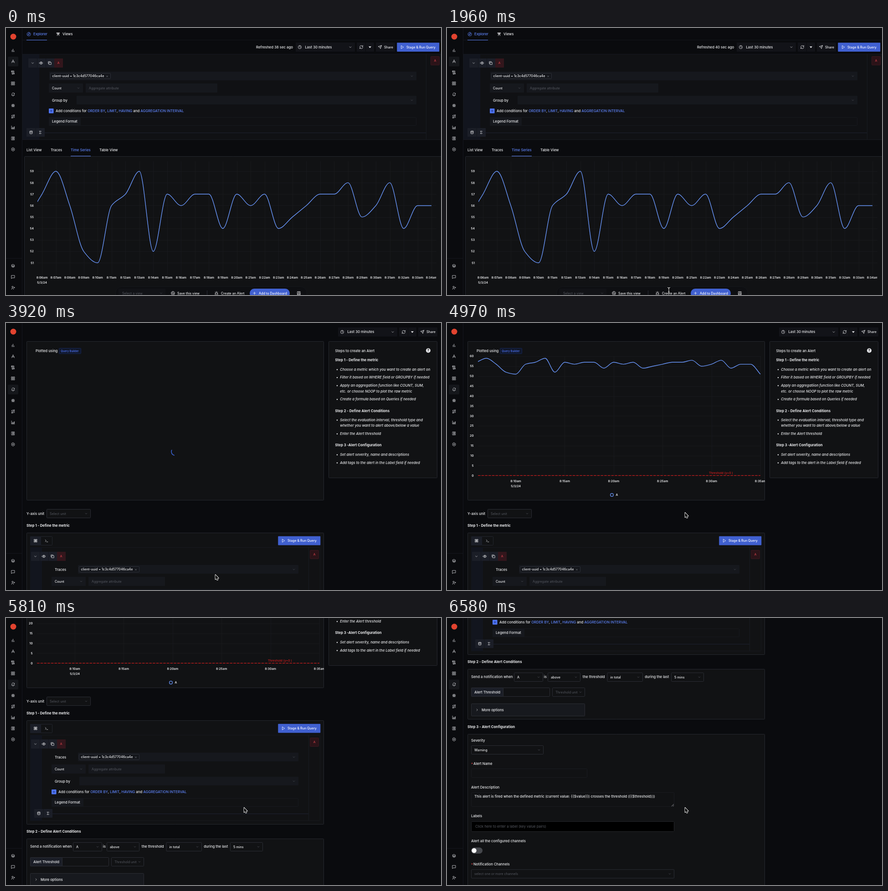
Recreate the animation shown at these times as an HTML page with a canvas. Size 955 by 587 pixels, loop 6.65 s.

```html
<!DOCTYPE html>
<html lang="en">
<head>
<meta charset="utf-8">
<title>Alert from trace explorer</title>
<style>
html, body { margin: 0; width: 100%; height: 100%; overflow: hidden; background: #0a0b0e; }
canvas { display: block; }
</style>
</head>
<body>
<canvas id="stage" width="955" height="587"></canvas>
<script>
const ctx = document.getElementById('stage').getContext('2d');
const LOOP = 6650, STEP = 70;
const BG = '#0a0b0e', PANEL = '#111214', FIELD = '#16181d', CHIP = '#1b1e27', EDGE = '#26282f', LINE = '#1b1e28';
const TEXT = '#eeeff1', MUTED = '#54575f', BLUE = '#5f84f8', BUTTON = '#4060d0', CURVE = '#6996fa', RED = '#d2424a';
const THRESHOLD = '#cc1d1d';
const LARGE = 7.74, SMALL = 7.18, TINY = 6.63;

const ICONS = {
  bars: 'M6 20V10M12 20V4M18 20v-6',
  compass: 'M12 7a2 2 0 1 0 0-4 2 2 0 0 0 0 4zM11 7 4 20M13 7l7 13M5 13c4 3 10 3 14 0',
  scroll: 'M8 21h12v-3H10v3a2 2 0 0 1-4 0V5a2 2 0 0 0-4 0v3h4M4 3h13v15M10 8h4M10 12h4',
  grid: 'M3 3h7v7H3zM14 3h7v7h-7zM14 14h7v7h-7zM3 14h7v7H3z',
  bell: 'M15 3a6 6 0 0 0-9 5c0 7-3 9-3 9h18s-2-1-3-5M10 21h4M19 5a2 2 0 1 0 0 4 2 2 0 0 0 0-4z',
  bug: 'M8 8a4 4 0 0 1 8 0M7 10h10v5a5 5 0 0 1-10 0zM12 11v9M3 13h4M17 13h4M4 20l3-2M20 20l-3-2M4 6l3 3M20 6l-3 3',
  route: 'M6 22a3 3 0 1 0 0-6 3 3 0 0 0 0 6zM9 19h8a3.5 3.5 0 0 0 0-7H7a3.5 3.5 0 0 1 0-7h8M18 8a3 3 0 1 0 0-6 3 3 0 0 0 0 6z',
  area: 'M3 3v18h18M7 16l4-6 4 4 5-7v9z',
  receipt: 'M4 3h16v18H4zM9 8h6M9 12h6M9 16h6M12 6v12',
  gear: 'M12 2l8.5 5v10L12 22l-8.5-5V7zM12 9a3 3 0 1 0 0 6 3 3 0 0 0 0-6z',
  layers: 'M12 3l9 5-9 5-9-5zM3 12l9 5 9-5M3 16l9 5 9-5',
  chat: 'M3 4h18v14H8l-5 4z',
  invite: 'M15 21a6 6 0 0 0-12 0M9 11a4 4 0 1 0 0-8 4 4 0 0 0 0 8zM19 8v6M16 11h6',
  explore: 'M12 2a10 10 0 1 0 0 20 10 10 0 0 0 0-20zM16 8l-2 6-6 2 2-6z',
  views: 'M4 4h16v4H4zM9 8l-2 13M15 8l2 13M12 8v5M8 13h8',
  clock: 'M12 2a10 10 0 1 0 0 20 10 10 0 0 0 0-20zM12 6v6l4 2',
  refresh: 'M3 11a9 9 0 0 1 17-3M21 3v5h-5M21 13a9 9 0 0 1-17 3M3 21v-5h5',
  send: 'M22 2 11 13M22 2l-7 20-4-9-9-4z',
  play: 'M6 3l14 9-14 9z',
  down: 'M5 9l7 7 7-7',
  right: 'M9 5l7 7-7 7',
  eye: 'M2 12c5-9 15-9 20 0-5 9-15 9-20 0zM12 9a3 3 0 1 0 0 6 3 3 0 0 0 0-6z',
  copy: 'M8 8h13v13H8zM4 16H3V3h13v1',
  close: 'M6 6l12 12M18 6 6 18',
  plus: 'M12 4v16M4 12h16',
  sigma: 'M18 7V4H6l7 8-7 8h12v-3',
  data: 'M4 5c0-3 16-3 16 0s-16 3-16 0v14c0 3 16 3 16 0V5M4 12c0 3 16 3 16 0',
  save: 'M12 2a10 10 0 1 0 0 20 10 10 0 0 0 0-20zM7 9h8l3 4M17 15H9l-3-4',
  alarm: 'M3 19h18M5 19v-3a7 7 0 0 1 14 0v3M12 3v4M4 6l2 2M20 6l-2 2',
  book: 'M4 3h16v18H4zM4 16h16M9 7h6M9 11h6',
  nodes: 'M4 4h6v6H4zM14 4h6v6h-6zM4 14h6v6H4zM14 14h6v6h-6zM10 10l4 4M14 10l-4 4',
  shell: 'M4 6l6 6-6 6M12 19h8'
};
const paths = Object.fromEntries(Object.entries(ICONS).map(([k, d]) => [k, new Path2D(d)]));

function icon(name, x, y, size = 9, color = TEXT, weight = 2.2) {
  ctx.save();
  ctx.translate(x - size / 2, y - size / 2);
  ctx.scale(size / 24, size / 24);
  ctx.lineWidth = weight;
  ctx.lineCap = ctx.lineJoin = 'round';
  ctx.strokeStyle = color;
  ctx.stroke(paths[name]);
  ctx.restore();
}

function text(str, x, y, { size = LARGE, color = TEXT, weight = 500, align = 'left', style = '' } = {}) {
  ctx.font = `${style} ${weight} ${size}px Inter, sans-serif`;
  ctx.textAlign = align;
  ctx.fillStyle = color;
  ctx.fillText(str, x, y + size * 0.36);
  return ctx.measureText(str).width;
}
const small = (str, x, y, color = TEXT) => text(str, x, y, { size: SMALL, color, weight: color === MUTED ? 400 : 500 });
const bold = (str, x, y) => text(str, x, y, { weight: 700 });

function box(x1, y1, x2, y2, fill, stroke, r = 1) {
  ctx.beginPath();
  if (stroke) ctx.roundRect(x1 + 0.5, y1 + 0.5, x2 - x1 - 1, y2 - y1 - 1, r);
  else ctx.roundRect(x1, y1, x2 - x1, y2 - y1, r);
  if (fill) { ctx.fillStyle = fill; ctx.fill(); }
  if (stroke) { ctx.strokeStyle = stroke; ctx.lineWidth = 1; ctx.stroke(); }
}
const rule = (x1, y1, x2, y2, color = LINE) => box(x1, y1, Math.max(x2, x1 + 1), Math.max(y2, y1 + 1), color, null, 0);

function disc(x, y, r, color) {
  ctx.beginPath();
  ctx.arc(x, y, r, 0, 7);
  ctx.fillStyle = color;
  ctx.fill();
}

function clipped(x, y, w, h, draw) {
  ctx.save();
  ctx.beginPath();
  ctx.rect(x, y, w, h);
  ctx.clip();
  draw();
  ctx.restore();
}

// Tangents of a monotone cubic through [x, y] points
function tangents(pts) {
  const last = pts.length - 1;
  const dx = [], slope = [];
  for (let i = 0; i < last; i++) {
    dx[i] = pts[i + 1][0] - pts[i][0];
    slope[i] = (pts[i + 1][1] - pts[i][1]) / dx[i];
  }
  return pts.map((_, i) => {
    if (i === 0) return slope[0];
    if (i === last) return slope[last - 1];
    const a = slope[i - 1], b = slope[i], p = dx[i - 1], q = dx[i];
    return a * b <= 0 ? 0 : 3 * (p + q) / ((2 * q + p) / a + (q + 2 * p) / b);
  });
}

function along(pts, t) {
  const last = pts.length - 1;
  if (t <= pts[0][0]) return pts[0][1];
  if (t >= pts[last][0]) return pts[last][1];
  const m = tangents(pts);
  const i = pts.findIndex(p => p[0] > t) - 1;
  const [x0, y0] = pts[i], [x1, y1] = pts[i + 1];
  const h = x1 - x0, u = (t - x0) / h, v = 1 - u;
  return y0 * (1 + 2 * u) * v * v + m[i] * h * u * v * v + y1 * u * u * (3 - 2 * u) - m[i + 1] * h * u * u * v;
}

// One value per minute from 8:05am
const COUNTS = [55, 57, 59, 56, 52, 51, 56, 57, 59, 52, 57, 56, 57, 57, 54, 57,
  56, 57, 54, 55, 56, 57, 57, 58, 55, 56, 58, 54, 56, 56, 51];
const clockLabel = i => `8:${String(5 + i).padStart(2, '0')}am`;

function curve(xOf, yOf) {
  const pts = COUNTS.map((v, i) => [xOf(i), yOf(v)]);
  const m = tangents(pts);
  ctx.beginPath();
  ctx.moveTo(...pts[0]);
  for (let i = 1; i < pts.length; i++) {
    const [x0, y0] = pts[i - 1], [x1, y1] = pts[i], h = (x1 - x0) / 3;
    ctx.bezierCurveTo(x0 + h, y0 + m[i - 1] * h, x1 - h, y1 - m[i] * h, x1, y1);
  }
  ctx.strokeStyle = CURVE;
  ctx.lineWidth = 1.4;
  ctx.stroke();
}

const GRID = '#18191c';
const axis = (str, x, y, align = 'center') => text(str, x, y, { size: TINY, weight: 600, align });

function sidebar(active) {
  rule(0, 0, 35, 587, BG);
  rule(35, 0, 36, 587, '#15171d');
  disc(16, 19, 6.5, '#e2432f');
  box(4, active - 10.5, 27, active + 11, '#15171b', null, 2);
  ['bars', 'compass', 'scroll', 'grid', 'bell', 'bug', 'route', 'area', 'receipt', 'gear']
    .forEach((name, i) => icon(name, 15.5, 49.3 + i * 24.18, 9, '#d2d4d8'));
  rule(0, 506, 35, 507, '#15171d');
  ['layers', 'chat', 'invite'].forEach((name, i) => icon(name, 15.5, 523 + i * 24, 9, '#d2d4d8'));
}

function timePicker(x, y) {
  box(x, y - 10, x + 130, y + 10, '#121318');
  icon('clock', x + 9, y, 8.5);
  text('Last 30 minutes', x + 20.5, y);
  icon('down', x + 120, y, 7);
  box(x + 134, y - 10, x + 172, y + 10, '#121318');
  icon('refresh', x + 144, y, 9);
  rule(x + 153, y - 10, x + 154, y + 10, BG);
  ctx.fillStyle = TEXT;
  ctx.beginPath();
  ctx.moveTo(x + 160, y - 1.5);
  ctx.lineTo(x + 166, y - 1.5);
  ctx.lineTo(x + 163, y + 2);
  ctx.fill();
  box(x + 176, y - 10, x + 218, y + 10, '#121318');
  icon('send', x + 185, y, 8.5);
  small('Share', x + 194, y);
}

function runButton(x, y) {
  box(x + 0.3, y, x + 93.3, y + 19.6, BUTTON);
  icon('play', x + 12, y + 9.8, 8.5, '#fff');
  text('Stage & Run Query', x + 21, y + 9.8, { size: 7.1, color: '#fff' });
}

function badge(x, y) {
  box(x, y, x + 20, y + 20, '#2b1318', '#3a181f');
  text('A', x + 10, y + 10, { size: TINY, color: RED, align: 'center' });
}

// Query form, placed relative to the explorer layout
function queryForm(dx, dy, right, filterLeft, footX, lineEnd) {
  ctx.save();
  ctx.translate(dx, dy);
  right -= dx; filterLeft -= dx; footX -= dx; lineEnd -= dx;
  box(49, 67, 125, 87, CHIP);
  box(106, 67, 125, 87, '#33161c');
  [68, 87].forEach(x => rule(x, 67, x + 1, 87, '#14161c'));
  icon('down', 58.5, 77, 7);
  icon('eye', 77, 77, 9);
  icon('copy', 96, 77, 8.5);
  text('A', 115, 77, { size: TINY, color: RED, align: 'center' });

  box(filterLeft, 96, right, 115, FIELD);
  const tag = filterLeft + 2;
  box(tag, 99, tag + 133, 112, '#14161b', '#2d3038');
  small('client-uuid = 1c3c4d577046ca4e', tag + 4.5, 105.8);
  icon('close', tag + 125, 106.3, 6, '#90939a');
  icon('down', right - 10, 105.7, 6.5, '#5a5d66');

  box(94, 122, 169, 142, FIELD);
  small('Count', 101, 132.2);
  icon('down', 159, 132, 6.5, '#5a5d66');
  box(175, 122, dx ? 343 : 464, 142, FIELD);
  small('Aggregate attribute', 182, 132.2, MUTED);
  text('Group by', 101, 158.8);
  box(155, 149, right, 168, FIELD);
  icon('down', right - 10, 158.7, 6.5, '#5a5d66');

  box(94, 177, 104.5, 187.5, '#4e74f8');
  icon('plus', 99.2, 182.2, 7, '#111c48');
  let x = 109;
  [['Add conditions for '], ['ORDER BY', 1], [', '], ['LIMIT', 1], [', '], ['HAVING', 1], [' and '], ['AGGREGATION INTERVAL', 1]]
    .forEach(([s, link]) => { x += text(s, x, 182.3, { color: link ? BLUE : TEXT }); });

  box(94, 196, right, 215, null, '#17191e');
  box(94, 196, 164, 215, FIELD);
  text('Legend Format', 101, 205.4);
  rule(footX + 40, 230, lineEnd, 231, '#1d2130');
  box(footX, 220, footX + 40, 239, CHIP);
  rule(footX + 19.5, 220, footX + 20, 239, '#14161c');
  icon('data', footX + 10, 229.5, 8.5);
  icon('sigma', footX + 30, 229.5, 8);
  ctx.restore();
}

function explorerPage(t) {
  icon('explore', 50, 13.5, 9.5, BLUE);
  text('Explorer', 60, 13.5, { color: BLUE });
  icon('views', 114.5, 13.5, 9);
  text('Views', 124, 13.5);
  rule(36, 26, 955, 27, '#14161c');
  rule(45, 26, 90, 27, BLUE);
  text(`Refreshed ${t < 70 ? 38 : t < 1680 ? 39 : 40} sec ago`, 549, 42);
  timePicker(636, 42);
  runButton(858, 32.3);

  rule(36, 57, 955, 245, '#101114');
  rule(36, 57, 73, 245, '#12151e');
  rule(36, 57, 955, 58, '#15171e');
  rule(922, 57, 923, 245, '#191b21');
  rule(36, 245, 955, 246, '#191b21');
  badge(932, 62);
  queryForm(0, 0, 901, 95, 45, 922);

  text('List View', 45, 268.5);
  text('Traces', 98, 268.5);
  text('Time Series', 142, 268.5, { color: BLUE });
  text('Table View', 205, 268.5);
  box(40, 282, 960, 592, PANEL, '#24272e');
  rule(142, 281, 186, 282, BLUE);

  const xOf = i => 79 + (i - 1) * 30.54, yOf = v => 315 + (59 - v) * 25.15;
  for (let v = 51; v <= 59; v++) {
    rule(69, Math.round(yOf(v)), 945, 0, GRID);
    axis(v, 61, yOf(v), 'right');
  }
  clipped(69, 288, 875.5, 290, () => {
    for (let i = 1; i < 30; i++) rule(Math.round(xOf(i)), 293, 0, 541, GRID);
  });
  clipped(60, 540, 884.5, 25, () => {
    for (let i = 1; i < 30; i++) axis(clockLabel(i), xOf(i), 549);
    axis('5/3/24', xOf(1), 559.5);
  });
  clipped(69, 288, xOf(29) - 69, 260, () => curve(xOf, yOf));

  box(240, 568, 661, 610, '#0e0f12', '#15171b', 14);
  box(247, 573, 350, 593, '#121317');
  small('Select a view', 255, 583, MUTED);
  icon('down', 340.5, 583, 6.5, MUTED);
  icon('save', 366.5, 583, 9);
  small('Save this view', 376, 583);
  rule(441, 577, 442, 587, '#2a2d35');
  ctx.globalAlpha = 1 - 0.3 * Math.min(1, Math.max(0, (t - 2310) / 280));
  icon('alarm', 462, 582.5, 9);
  small('Create an Alert', 472, 583);
  ctx.globalAlpha = 1;
  box(535, 573, 623, 593, BUTTON, null, 10);
  icon('plus', 545.5, 583, 8, '#fff');
  small('Add to Dashboard', 555, 583, '#fff');
  icon('book', 643, 583, 9);
}

function alertChart() {
  const xOf = i => 151 + (i - 5) * 21.48, yOf = v => 335.3 - v * 4.37;
  for (let v = 0; v <= 60; v += 5) {
    rule(68, Math.round(yOf(v)), 688, 0, GRID);
    axis(v, 58.5, yOf(v), 'right');
  }
  clipped(46, 66, 652, 310, () => {
    for (let i = 5; i <= 30; i += 5) {
      rule(Math.round(xOf(i)), 73, 0, 335, GRID);
      axis(clockLabel(i), xOf(i), 347.7);
    }
    axis('5/3/24', xOf(5), 358.2);
  });
  clipped(68, 66, 621, 280, () => curve(xOf, yOf));
  ctx.strokeStyle = THRESHOLD;
  ctx.lineWidth = 1.3;
  ctx.setLineDash([5.5, 2.2]);
  ctx.beginPath();
  ctx.moveTo(68, yOf(0));
  ctx.lineTo(688, yOf(0));
  ctx.stroke();
  ctx.setLineDash([]);
  text('Threshold (y=0 )', 575, 329.5, { size: TINY, color: THRESHOLD });
  ctx.strokeStyle = CURVE;
  ctx.beginPath();
  ctx.arc(362, 378, 3.3, 0, 7);
  ctx.stroke();
  axis('A', 373, 378);
}

function spinner(t) {
  const turn = (t - 3920) / 1200 * Math.PI * 2;
  ctx.strokeStyle = '#3b64d6';
  ctx.lineWidth = 1.6;
  ctx.lineCap = 'round';
  ctx.beginPath();
  ctx.arc(371, 283, 8, turn + 1.8, turn + 3.6);
  ctx.stroke();
  ctx.lineCap = 'butt';
}

function select(x1, y, x2, label, color = TEXT) {
  box(x1, y - 10, x2, y + 10, PANEL, '#2b2d34');
  small(label, x1 + 7, y, color);
  icon('down', x2 - 10, y, 6.5, '#60636c');
}

function required(label, y) {
  text('*', 53, y + 1, { color: '#dc4446' });
  text(label, 58, y);
}

function guide() {
  box(708, 40, 947, 341, PANEL, EDGE);
  text('Steps to create an Alert', 722.5, 61);
  disc(927, 60.5, 5, '#e4e5e8');
  text('?', 927, 60.5, { weight: 700, color: PANEL, align: 'center' });
  bold('Step 1 - Define the metric', 722.5, 81.5);
  bold('Step 2 - Define Alert Conditions', 722.5, 193);
  bold('Step 3 -Alert Configuration', 722.5, 268.5);
  [[102, 'Choose a metric which you want to create an alert on'],
   [119.5, 'Filter it based on WHERE field or GROUPBY if needed'],
   [137.3, 'Apply an aggregatiion function like COUNT, SUM,', 'etc. or choose NOOP to plot the raw metric'],
   [167.5, 'Create a formula based on Queries if needed'],
   [213, 'Select the evaluation interval, threshold type and', 'whether you want to alert above/below a value'],
   [243.3, 'Enter the Alert threshold'],
   [289.2, 'Set alert severity, name and descriptions'],
   [307, 'Add tags to the alert in the Label field if needed']
  ].forEach(([y, ...lines]) => {
    disc(727, y + 0.5, 1.2, TEXT);
    lines.forEach((line, i) => text(line, 733.3, y + i * 12.5, { style: 'italic' }));
  });
}

function alertForm() {
  text('Y-axis unit', 45, 419.3);
  select(89, 419, 186, 'Select unit', MUTED);

  bold('Step 1 - Define the metric', 45, 445);
  box(45, 461, 698, 690, PANEL, EDGE);
  box(53, 469, 102, 489, null, '#22252d');
  box(53, 469, 77, 489, CHIP);
  icon('nodes', 65, 478.7, 9);
  icon('shell', 89, 478.7, 8.5);
  runButton(597, 468.8);
  box(53, 493, 690, 682, null, '#17191e');
  rule(53, 493, 79, 682, '#12151e');
  rule(664, 493, 665, 682, '#191b21');
  badge(667, 499);
  text('Traces', 107, 542);
  queryForm(6, 436, 642, 158, 62, 664);

  bold('Step 2 - Define Alert Conditions', 45, 705);
  box(45, 721, 698, 832, PANEL, EDGE);
  text('Send a notification when', 53, 738.7);
  select(147, 739, 211, 'A');
  text('is', 212.7, 738.7);
  select(221, 739, 293, 'above');
  text('the threshold', 297.8, 738.7);
  select(351.5, 739, 430, 'in total');
  text('during the last', 434.3, 738.7);
  select(492, 739, 564, '5 mins');
  box(53, 762, 226, 782, PANEL, '#2b2d34');
  box(53, 762, 124, 782, CHIP, '#2b2d34');
  text('Alert Threshold', 60, 772.2);
  select(231, 772, 303, 'Threshold unit', MUTED);
  box(53, 797, 303, 825, '#17191e', '#2b2d34');
  icon('right', 66, 811, 7);
  text('More options', 76, 811);

  bold('Step 3 - Alert Configuration', 45, 848);
  box(45, 864, 698, 1400, PANEL, EDGE);
  text('Severity', 53, 878.3);
  select(53, 899, 212, 'Warning');
  required('Alert Name', 929.5);
  box(53, 940, 308, 960, null, '#191b20');
  text('Alert Description', 53, 981);
  box(53, 992, 499, 1024, null, '#191b20');
  text('This alert is fired when the defined metric (current value: {{$value}}) crosses the threshold ({{$threshold}})', 60, 1001.7);
  ctx.strokeStyle = '#b5b6b9';
  ctx.lineWidth = 0.8;
  ctx.beginPath();
  ctx.moveTo(493, 1023); ctx.lineTo(498, 1018);
  ctx.moveTo(496, 1023); ctx.lineTo(498, 1021);
  ctx.stroke();
  text('Labels', 53, 1044.7);
  box(53, 1056, 499, 1079, '#000', '#25272c');
  text('Click here to enter a label (key value pairs)', 62, 1067, { color: MUTED, weight: 400 });
  text('Alert all the configured channels', 53, 1099.5);
  box(53, 1113.5, 78, 1127, '#45474c', null, 6.7);
  disc(59.5, 1120.3, 5.2, '#fff');
  required('Notification Channels', 1150.7);
  select(53, 1171.5, 499, 'select one or more channels', MUTED);
}

const SCROLL = [[5040, 0], [5390, 86], [5810, 236], [6160, 489], [6580, 609]];

function alertPage(t) {
  ctx.save();
  ctx.translate(0, -Math.round(along(SCROLL, t)));
  timePicker(729, 19.7);
  box(45, 40, 698, 390, PANEL, EDGE);
  if (t >= 4340) alertChart();
  else if (t >= 3360) spinner(t);
  text('Plotted using', 65, 61);
  box(116, 55, 165, 68, '#10172a', '#162654');
  text('Query Builder', 120.3, 61.5, { size: 6, color: '#4e74f8' });
  guide();
  alertForm();
  ctx.restore();
}

function shape(points, x, y, fill, stroke) {
  ctx.beginPath();
  points.forEach(([px, py]) => ctx.lineTo(x + px, y + py));
  ctx.closePath();
  ctx.lineJoin = 'round';
  ctx.lineWidth = 1.8;
  ctx.strokeStyle = stroke;
  ctx.stroke();
  ctx.fillStyle = fill;
  ctx.fill();
}
const ARROW = [[0.6, 0.9], [0.6, 11], [2.9, 8.9], [4.5, 12.7], [6.1, 12], [4.6, 8.4], [7.7, 8.4]];
const HAND = [[-1, 0], [1, 0], [1.2, 5], [6, 6.5], [6.5, 10], [4.5, 15], [-3, 15], [-7, 9], [-5.5, 8], [-1.2, 10]];

function beam(x, y) {
  for (const [color, width] of [['#000', 2.6], ['#e8e8e8', 1.1]]) {
    ctx.strokeStyle = color;
    ctx.lineWidth = width;
    ctx.beginPath();
    ctx.moveTo(x - 3, y - 6.5); ctx.quadraticCurveTo(x, y - 6.5, x, y - 4);
    ctx.lineTo(x, y + 4); ctx.quadraticCurveTo(x, y + 6.5, x - 3, y + 6.5);
    ctx.moveTo(x + 3, y - 6.5); ctx.quadraticCurveTo(x, y - 6.5, x, y - 4);
    ctx.moveTo(x, y + 4); ctx.quadraticCurveTo(x, y + 6.5, x + 3, y + 6.5);
    ctx.moveTo(x - 1.5, y + 2.5); ctx.lineTo(x + 1.5, y + 2.5);
    ctx.stroke();
  }
}

const CURSOR_X = [[3500, 487], [3920, 459], [3990, 464], [4130, 495], [4340, 519], [4620, 522]];
const CURSOR_Y = [[770, 590], [1190, 577], [3500, 577], [3920, 552.5], [3990, 535], [4130, 470], [4340, 422], [4620, 416]];

function cursor(t) {
  if (t < 840) return;
  const x = along(CURSOR_X, t), y = along(CURSOR_Y, t);
  if (t >= 1820 && t < 1960) disc(x, y, 18, 'rgba(255,255,255,.14)');
  if (t >= 1960 && t < 2380) beam(x, y);
  else if (t < 3010) shape(HAND, x, y, '#fff', '#000');
  else shape(ARROW, x, y, '#000', '#fff');
}

function render(t) {
  ctx.globalAlpha = 1;
  rule(0, 0, 955, 587, BG);
  if (t < 3010) explorerPage(t);
  else if (t >= 3150) {
    alertPage(t);
    if (t < 3220) rule(36, 0, 955, 587, 'rgba(10,11,14,.5)');
  }
  sidebar(t < 3360 ? 73.5 : 146);
  cursor(t);
}

const start = performance.now();
function tick() {
  const t = (performance.now() - start) % LOOP;
  render(Math.floor(t / STEP) * STEP);
  requestAnimationFrame(tick);
}
tick();
</script>
</body>
</html>
```
